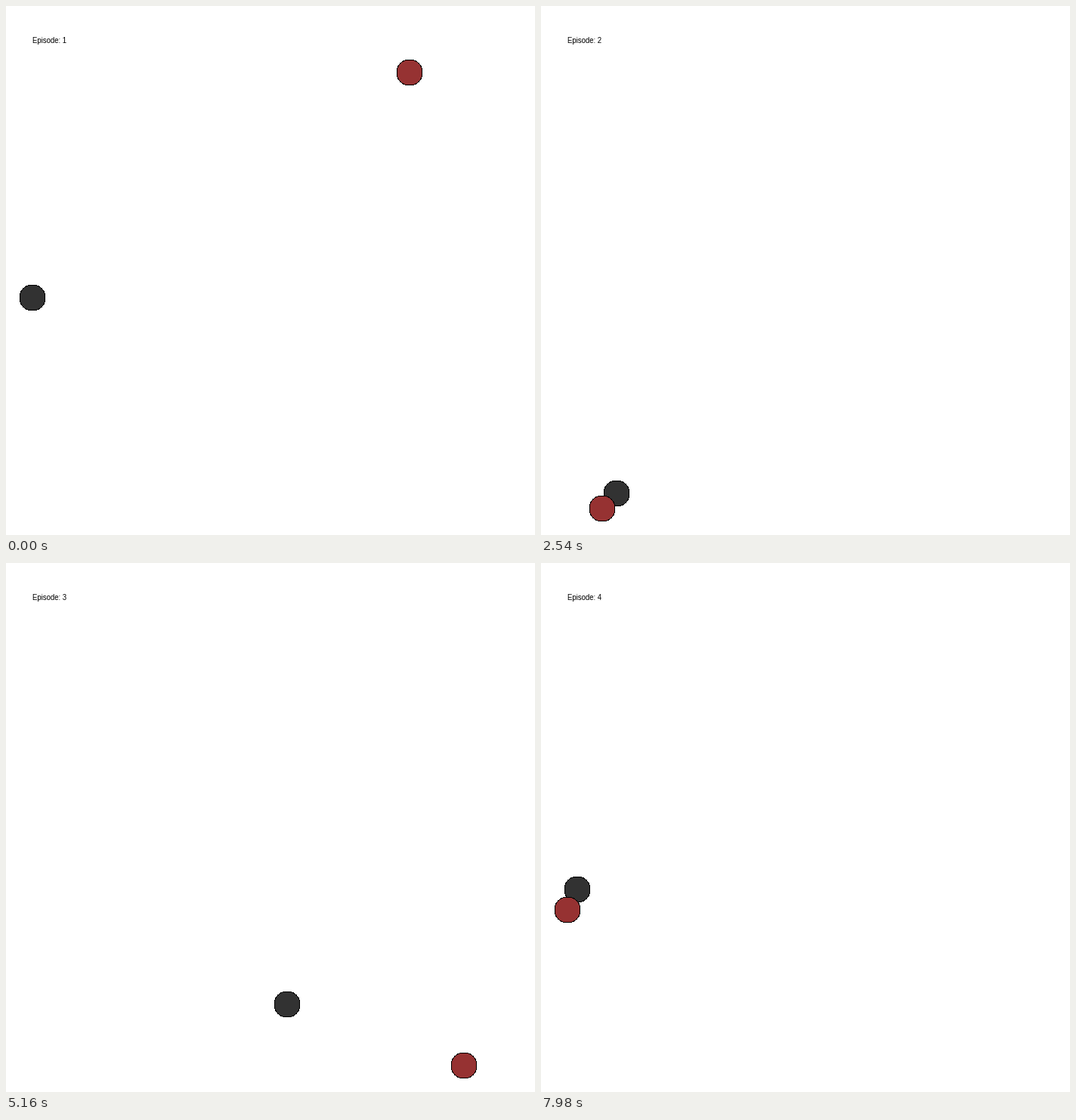
Write a matplotlib script that moves like this. It is 700x700 px and loops after 8000 ms.

```python
import numpy as np
import matplotlib.pyplot as plt
from matplotlib.animation import FuncAnimation
from matplotlib.patches import Circle

SIZE, DPI = 700, 100
TICK, LOOP = 20, 8000             # ms
FIRST, STEP, STEPS = 20, 100, 25  # each episode: one short frame, then 25 steps
EPISODE = FIRST + STEP * STEPS
LEAD = 600                        # the loop opens inside the first episode
MID, REACH, RADIUS = SIZE / 2, SIZE * 0.45, 17


class Approach:
    """Agent closing in on its resting place from two known (step, x, y) points.

    The distance left shrinks as exp(-step**power), separately in x and y.
    """

    def __init__(self, goal, early, late, rest, power):
        self.goal = np.array(goal, float)
        self.rest = np.array(rest, float)
        self.power = np.array(power, float)
        self.steps = early[0], late[0]
        self.start = np.array(early[1:]) - self.rest
        self.ratio = (np.array(late[1:]) - self.rest) / self.start

    def agent(self, step):
        a, b, s = (k ** self.power for k in (*self.steps, step))
        return self.rest + self.start * self.ratio ** ((s - a) / (b - a))


EPISODES = [
    Approach((223, -315), (6, -380, 44), (13, -18, -241), (208.5, -313.5), (4, 1)),
    Approach((-269, 315), (0, 0, 60), (7, -250, 295), (-277, 311.5), (1, 0.6)),
    Approach((256, 315), (0, -280, -10), (8, 22, 234), (243, 314), (2.5, 1.5)),
    Approach((-315, 109), (0, -74, -266), (9, -284, 60), (-315, 109), (1.75, 1.3)),
]


def state(t):
    number, u = divmod(t + LEAD, EPISODE)
    step = 0 if u < FIRST else 1 + (u - FIRST) // STEP
    episode = EPISODES[number]
    spots = np.array([episode.agent(step), episode.goal])
    # the camera always fits the farthest coordinate
    zoom = REACH / np.abs(spots).max()
    return number + 1, np.floor(MID + spots * zoom + 1e-6)


fig = plt.figure(figsize=(SIZE / DPI, SIZE / DPI), dpi=DPI, facecolor="white")
ax = fig.add_axes([0, 0, 1, 1])
ax.set(xlim=(0, SIZE), ylim=(SIZE, 0))
ax.axis("off")


def disc(color, z):
    """Black disc with a coloured one inside, leaving a one-pixel rim."""
    layers = [(RADIUS, "black"), (RADIUS - 1, color)]
    return [ax.add_patch(Circle((0, 0), r, facecolor=c, linewidth=0,
                                antialiased=False, zorder=z))
            for r, c in layers]


discs = [disc("#323232", 2), disc("#963232", 3)]
label = ax.text(35, 48.8, "", family="Liberation Sans",
                fontsize=9.7 * 72 / DPI, color="black", zorder=4)


def draw(frame):
    number, spots = state(frame * TICK)
    for layers, spot in zip(discs, spots):
        for layer in layers:
            layer.center = spot
    label.set_text(f"Episode: {number}")
    return [*discs[0], *discs[1], label]


anim = FuncAnimation(fig, draw, frames=LOOP // TICK, interval=TICK,
                     repeat=True, repeat_delay=0)
plt.show()
```
